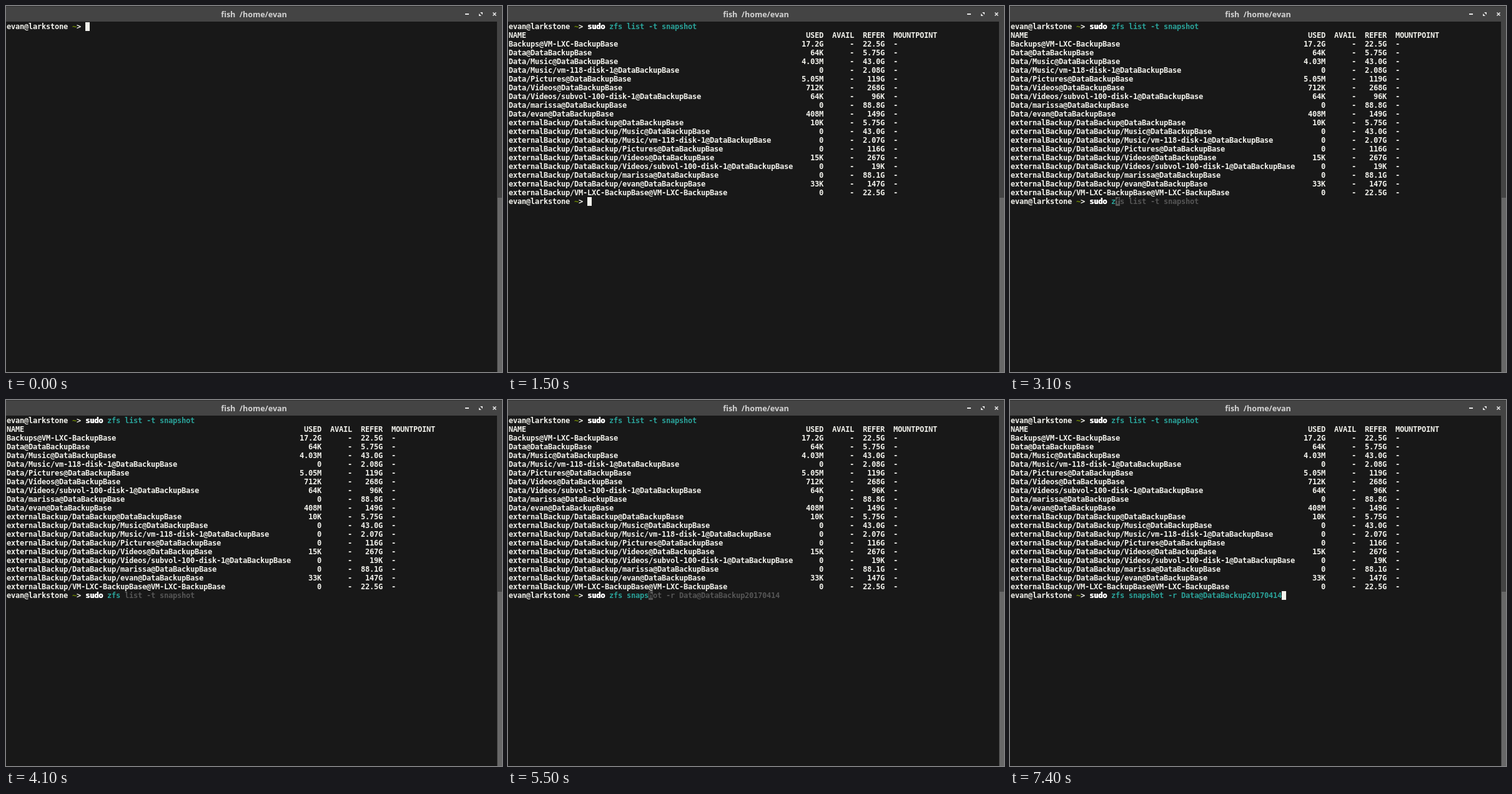
These frames come from a looping animation (794 by 586 pixels, 8000 ms). An HTML page:

```html
<!DOCTYPE html>
<html lang="en">
<head>
<meta charset="utf-8">
<title>Terminal</title>
<style>
html, body { margin: 0; width: 100%; height: 100%; overflow: hidden; background: #181818; }
#bar { position: absolute; left: 0; top: 0; width: 100%; height: 25px; box-sizing: border-box;
  background: #444; border-top: 1px solid #303030; }
#title { position: absolute; left: 0; top: 4px; width: 794px; text-align: center; white-space: pre;
  font: 600 12.5px/18px "Noto Sans", sans-serif; color: #d3d3d3; }
#icons { position: absolute; left: 730px; top: 5px; }
#screen { position: absolute; left: 1px; top: 26px; margin: 0; color: #f2f2ec;
  font: bold 12px/14px "DejaVu Sans Mono", monospace; letter-spacing: calc(7px - 1ch); }
#track { position: absolute; left: 786px; top: 25px; width: 8px; bottom: 0; background: #444; }
#thumb { position: absolute; left: 1px; top: 282px; width: 7px; bottom: 0; background: #686868; }
.cmd { color: #fff; text-shadow: .7px 0 #fff; }
.arg { color: #2aa198; }
.bad { color: #cb4b16; }
.dir { color: #718c00; }
.ghost { color: #555; }
.cursor { display: inline-block; height: 14px; vertical-align: top; background: #f2f2ec; color: #181818; }
.cursor.dim { background: #555; }
</style>
</head>
<body>
<div id="bar">
  <div id="title"></div>
  <svg id="icons" width="60" height="16" fill="#e4e4e4">
    <path d="M5 6h6v2h-6zM29 4h4v4zM27 6v4h4z"/>
    <path d="M49.5 4.5l5 5m0-5l-5 5" stroke="#e4e4e4" stroke-width="1.6"/>
  </svg>
</div>
<pre id="screen"></pre>
<div id="track"><div id="thumb"></div></div>
<script>
const LOOP = 8000, USER = 'evan', HOST = 'larkstone';
const LIST = 'sudo zfs list -t snapshot';
const SNAP = 'sudo zfs snapshot -r Data@DataBackup20170414';
const SHOWN = 500, RUN = 1400, DONE = 1500, ACCEPT = 7400;
const KEYS = [2400, 2600, 2700, 2900, 3000, 3100, 3300, 3400, 3500,
  4600, 4800, 5000, 5100, 5500, 5600, 5800, 6100, 6300];
const CURSOR_OFF = [[300, 500], [1100, 1400], [2000, 2400], [4100, 4600], [6900, 7300]];

const B = '@DataBackupBase', X = 'externalBackup/DataBackup';
const table = [
  ['NAME', 'USED', 'REFER', 'AVAIL', 'MOUNTPOINT'],
  ['Backups@VM-LXC-BackupBase', '17.2G', '22.5G'],
  ['Data' + B, '64K', '5.75G'],
  ['Data/Music' + B, '4.03M', '43.0G'],
  ['Data/Music/vm-118-disk-1' + B, '0', '2.08G'],
  ['Data/Pictures' + B, '5.05M', '119G'],
  ['Data/Videos' + B, '712K', '268G'],
  ['Data/Videos/subvol-100-disk-1' + B, '64K', '96K'],
  ['Data/marissa' + B, '0', '88.8G'],
  [`Data/${USER}` + B, '408M', '149G'],
  [X + B, '10K', '5.75G'],
  [X + '/Music' + B, '0', '43.0G'],
  [X + '/Music/vm-118-disk-1' + B, '0', '2.07G'],
  [X + '/Pictures' + B, '0', '116G'],
  [X + '/Videos' + B, '15K', '267G'],
  [X + '/Videos/subvol-100-disk-1' + B, '0', '19K'],
  [X + '/marissa' + B, '0', '88.1G'],
  [`${X}/${USER}` + B, '33K', '147G'],
  ['externalBackup/VM-LXC-BackupBase@VM-LXC-BackupBase', '0', '22.5G']
].map(([name, used, refer, avail = '-', mount = '-']) =>
  name.padEnd(65) + used.padStart(7) + avail.padStart(7) + refer.padStart(7) + '  ' + mount
).join('\n');

const span = (cls, text) => text && `<span class="${cls}">${text}</span>`;
const prompt = `${USER}@${HOST} ${span('dir', '~')}&gt; `;

function paint(text, plain) {
  if (plain) return text;
  if (text.length < 4) return span('bad', text);
  return span('cmd', text.slice(0, 4)) + span('arg', text.slice(4));
}

// Typed text, cursor, then the greyed completion the cursor sits on.
function line(text, ghost, cursor, plain) {
  let tail = span('ghost', ghost);
  if (cursor) {
    tail = span(ghost ? 'cursor dim' : 'cursor', ghost[0] || ' ') + span('ghost', ghost.slice(1));
  }
  return prompt + paint(text, plain) + tail;
}

function view(t) {
  const cursor = !CURSOR_OFF.some(([a, b]) => t >= a && t < b);
  if (t < DONE) return line(t < SHOWN ? '' : LIST, '', cursor);
  const typed = t < ACCEPT ? KEYS.filter(k => k <= t).length : SNAP.length;
  const hint = t < 2500 ? '' : t < 4600 ? LIST : t < 4700 ? '' : SNAP;
  return line(LIST, '', false) + '\n' + table + '\n' +
    line(SNAP.slice(0, typed), hint.slice(typed), cursor, t < 2500);
}

const screenEl = document.getElementById('screen');
const titleEl = document.getElementById('title');
let last;
function draw(now) {
  const t = now % LOOP;
  const html = view(t);
  if (html !== last) screenEl.innerHTML = last = html;
  const title = `${t >= RUN && t < DONE ? 'sudo' : 'fish'}  /home/${USER}`;
  if (titleEl.textContent !== title) titleEl.textContent = title;
}

const start = performance.now();
function tick() {
  draw(performance.now() - start);
  requestAnimationFrame(tick);
}
tick();
</script>
</body>
</html>
```
